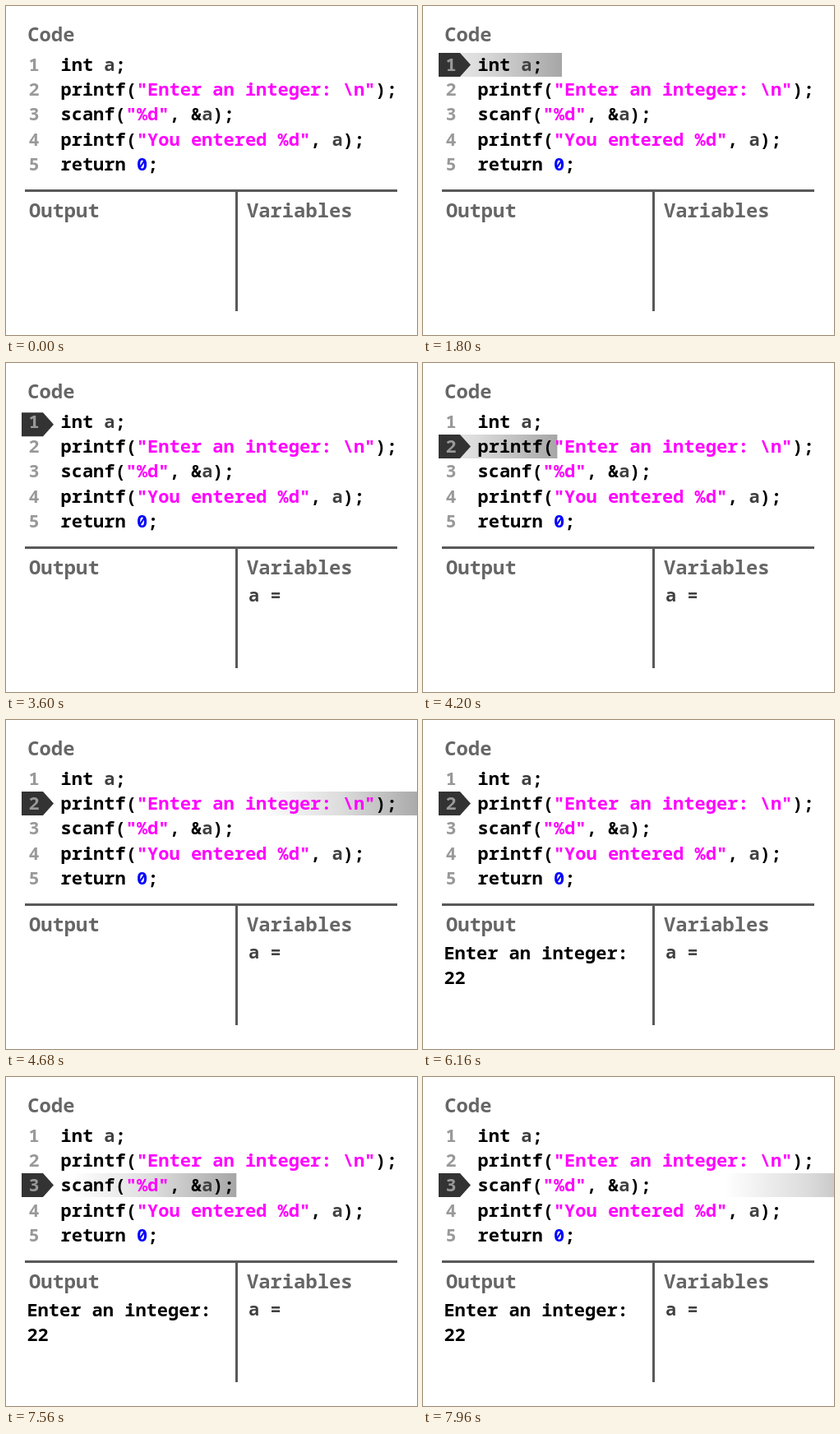
An HTML page for the animation above (8000 ms loop, 500 px wide and 400 px high).

```html
<!DOCTYPE html>
<html lang="en">
<head>
<meta charset="utf-8">
<title>Program trace</title>
<style>
  html, body { margin: 0; width: 100%; height: 100%; overflow: hidden; background: #fff; }
  svg { display: block; width: 500px; height: 400px; }
  text { font: 600 22px "Noto Sans Mono", "DejaVu Sans Mono", monospace; fill: #000; white-space: pre; }
  .head { font-size: 23.8px; fill: #666; }
  .num { fill: #999; }
  .str { fill: #f0f; }
  .val { fill: #00f; }
  .var { fill: #404040; }
</style>
</head>
<body>
<svg viewBox="0 0 500 400">
  <defs>
    <linearGradient id="glow">
      <stop offset="0" stop-color="#fff"/>
      <stop offset=".5" stop-color="#dcdcdc"/>
      <stop offset="1" stop-color="#a6a6a6"/>
    </linearGradient>
    <clipPath id="track"><rect x="32" width="468" height="400"/></clipPath>
  </defs>
  <g clip-path="url(#track)"><rect id="beam" width="200" height="29" fill="url(#glow)"/></g>
  <path id="arrow" d="M0 0H26L39 14.5 26 29H0Z" fill="#333"/>

  <text class="head" x="26.3" y="43">Code</text>
  <g id="code"></g>

  <path d="M23 224.5H476M280.5 224.5V371" stroke="#595959" stroke-width="3"/>
  <text class="head" x="28" y="257.3">Output</text>
  <text class="head" x="293" y="257.3">Variables</text>
  <text id="prompt" x="25.4" y="291">Enter an integer:</text>
  <text id="input" x="25.4" y="321">22</text>
  <text id="variable" x="295" y="290"><tspan class="var">a =</tspan></text>
</svg>
<script>
const LOOP = 8000, TICK = 40;
const ROW_TOP = 57, ROW_STEP = 30;
const BEAM_WIDTH = 200, BEAM_SPEED = 0.718;
const byId = id => document.getElementById(id);
const span = (name, s) => `<tspan class="${name}">${s}</tspan>`;
const a = span('var', 'a');

const lines = [
  `int ${a};`,
  `printf(${span('str', '"Enter an integer: \\n"')});`,
  `scanf(${span('str', '"%d"')}, &amp;${a});`,
  `printf(${span('str', '"You entered %d"')}, ${a});`,
  `return ${span('val', '0')};`
];
byId('code').innerHTML = lines.map((line, i) => {
  const y = 79.2 + 30.1 * i;
  return `<text class="num" x="27.5" y="${y}">${i + 1}</text><text x="66.5" y="${y}">${line}</text>`;
}).join('');

// Each beam: when it sets off, and the moment its right edge passes x
const beams = [
  { from: 1600, at: 1800, x: 169 },
  { from: 4000, at: 4400, x: 307 },
  { from: 7200, at: 7600, x: 309 }
];

const progress = (t, start, end) => Math.min(1, Math.max(0, (t - start) / (end - start)));
const place = (el, x, y) => el.setAttribute('transform', `translate(${x} ${y})`);
const show = (id, on) => byId(id).setAttribute('visibility', on ? 'visible' : 'hidden');

function draw(t) {
  const row = progress(t, 3560, 3920) + progress(t, 6760, 7120);
  place(byId('arrow'), -39 + 58 * progress(t, 960, 1520), ROW_TOP + ROW_STEP * row);

  const i = beams.findLastIndex(b => t >= b.from);
  show('beam', i >= 0);
  if (i >= 0) {
    const right = beams[i].x + (t - beams[i].at) * BEAM_SPEED;
    place(byId('beam'), right - BEAM_WIDTH, ROW_TOP + ROW_STEP * i);
  }

  show('variable', t >= 2960);
  show('prompt', t >= 5360);
  show('input', t >= 6160);
}

const start = performance.now();
function frame() {
  const t = (performance.now() - start) % LOOP;
  draw(Math.floor(t / TICK) * TICK);
  requestAnimationFrame(frame);
}
frame();
</script>
</body>
</html>
```
